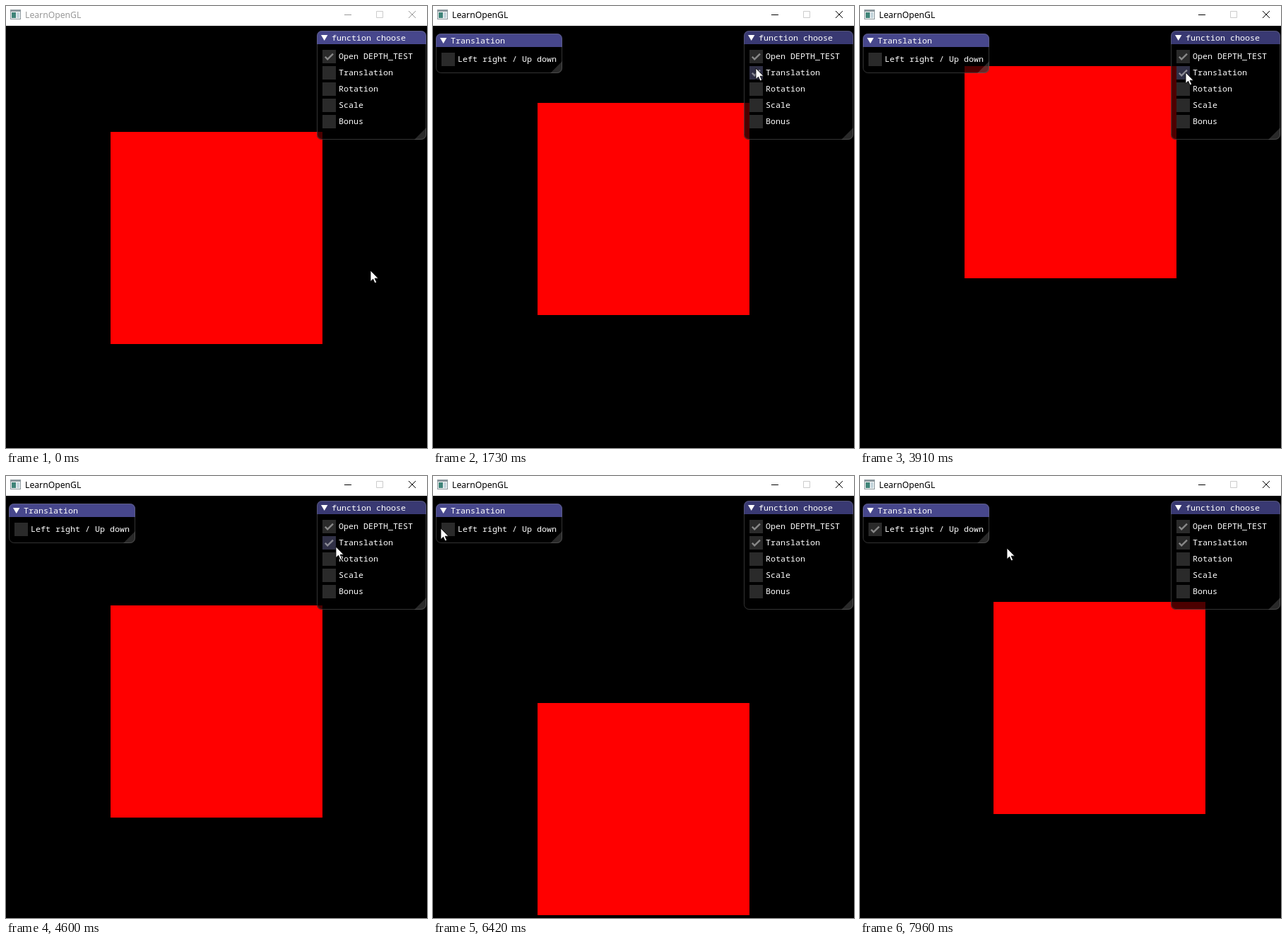
Animation of 596x625 px, one loop 8000 ms. Source, as an HTML page:

```html
<!DOCTYPE html>
<html lang="en">
<head>
<meta charset="utf-8">
<title>LearnOpenGL</title>
<style>
  html, body { margin: 0; width: 100%; height: 100%; overflow: hidden; background: #000; }
  svg { display: block; width: 596px; height: 625px; }
  text { white-space: pre; }
  .caption { font: 12.2px "Noto Sans", "Open Sans", sans-serif; fill: #999; }
  .buttons path { fill: none; stroke: #999; }
  .buttons .disabled { stroke: #ccc; }
  .focused .caption { fill: #000; }
  .focused .buttons path:not(.disabled) { stroke: #000; }
  .panel text { font: 11.667px "Noto Sans Mono", "DejaVu Sans Mono", monospace; fill: #fff; }
  .body { fill: rgba(0, 0, 0, .7); }
  .head { fill: rgba(69, 69, 138, .83); }
  .active .head { fill: rgba(82, 82, 161, .87); }
  .edge { fill: none; stroke: rgba(128, 128, 128, .4); }
  .grip { fill: rgba(255, 255, 255, .16); }
  .box { fill: rgba(110, 110, 110, .39); }
  .hover .box { fill: rgba(120, 120, 176, .4); }
  .press .box { fill: rgba(107, 105, 163, .69); }
  .tick { fill: none; stroke: rgba(230, 230, 230, .5); stroke-width: 2.4; visibility: hidden; }
  .on .tick { visibility: inherit; }
</style>
</head>
<body>
<svg id="stage" viewBox="0 0 596 625">
  <rect width="596" height="625"/>
  <rect id="quad" width="300" height="300" fill="#f00" shape-rendering="crispEdges"/>
  <g id="panels"></g>
  <g id="bar">
    <rect width="596" height="28" fill="#fff"/>
    <g shape-rendering="crispEdges">
      <rect x="6" y="5" width="15" height="14" fill="#8b979d"/>
      <rect x="7" y="8" width="13" height="10" fill="#f4f6f6"/>
      <rect x="8" y="9" width="6" height="8" fill="#3f8479"/>
      <rect x="15" y="9" width="4" height="8" fill="#c4d5dc"/>
    </g>
    <text class="caption" x="27" y="17">LearnOpenGL</text>
    <g class="buttons">
      <path d="M479 12.5H489"/>
      <path class="disabled" d="M524.5 7.5h9v9h-9z"/>
      <path d="M570 7L580 17M580 7L570 17"/>
    </g>
  </g>
  <path id="cursor" d="M0 0V15.6L3.6 12.2 6.1 17.8 8.6 16.7 6.1 11.2H11Z" fill="#fff" stroke="#000" stroke-width=".8"/>
</svg>
<script>
const LOOP = 8000, STEP = 46.4, LAST = 171;
const FOCUS = 25, MOVE = 26, PRESS = 143, SIDEWAYS = 145;
const $ = id => document.getElementById(id);

function node(parent, tag, attrs, text) {
  const el = document.createElementNS('http://www.w3.org/2000/svg', tag);
  for (const key in attrs) el.setAttribute(key, attrs[key]);
  if (text) el.textContent = text;
  return parent.appendChild(el);
}

function panel(x, y, w, h, title, labels) {
  const g = node($('panels'), 'g', { class: 'panel', transform: `translate(${x} ${y})` });
  node(g, 'path', { class: 'body', d: `M0 19H${w}V${h - 7}a7 7 0 0 1 -7 7H7a7 7 0 0 1 -7 -7Z` });
  node(g, 'path', { class: 'head', d: `M0 19V7a7 7 0 0 1 7 -7H${w - 7}a7 7 0 0 1 7 7V19Z` });
  node(g, 'path', { class: 'grip', d: `M${w} ${h - 17}V${h - 7}a7 7 0 0 1 -7 7H${w - 17}Z` });
  node(g, 'rect', { class: 'edge', x: .5, y: .5, width: w - 1, height: h - 1, rx: 7 });
  node(g, 'path', { d: 'M6 6H15.4L10.7 14Z', fill: '#fff' });
  node(g, 'text', { x: 21, y: 14 }, title);
  const rows = labels.map((label, i) => {
    const row = node(g, 'g', { transform: `translate(8 ${27 + 23 * i})` });
    node(row, 'rect', { class: 'box', width: 19, height: 19 });
    node(row, 'path', { class: 'tick', d: 'M3.8 9.8L7.2 13.4 15 5.6' });
    node(row, 'text', { x: 23, y: 13 }, label);
    return row;
  });
  return { g, rows };
}

const main = panel(440, 35, 155, 154, 'function choose',
  ['Open DEPTH_TEST', 'Translation', 'Rotation', 'Scale', 'Bonus']);
const side = panel(4, 39, 179, 56, 'Translation', ['Left right / Up down']);
main.rows[0].classList.add('on');

// [step, angle] and [step, x, y]
const phase = [[26, -.242], [37, .2768], [42, .508], [55, 1.105], [84, 2.473],
  [99, 3.175], [120, 4.164], [138, 5.019], [169, 6.457], [171, 6.56]];
const route = [[0, 516, 374], [17, 459, 88], [20, 457, 88], [67, 457, 88], [84, 461, 94],
  [99, 467, 100], [103, 467, 100], [120, 3, 78], [131, 0, 61], [134, 0, 61], [138, 11, 74],
  [142, 16, 78], [152, 16, 78], [160, 20, 82], [169, 128, 90], [171, 208, 102]];

const linear = p => p;
const smooth = p => p * p * (3 - 2 * p);

function sample(keys, k, ease) {
  let i = 0;
  while (i < keys.length - 2 && k >= keys[i + 1][0]) i++;
  const [a, b] = [keys[i], keys[i + 1]];
  const p = ease((k - a[0]) / (b[0] - a[0]));
  return a.slice(1).map((v, n) => v + (b[n + 1] - v) * p);
}

function setRow(row, on, hover, press) {
  row.classList.toggle('on', on);
  row.classList.toggle('hover', hover);
  row.classList.toggle('press', press);
}

function draw(now) {
  // The picture advances in fixed steps, like a screen capture.
  const k = Math.min(LAST, Math.max(0, Math.floor((now % LOOP - 5) / STEP)));
  const moving = k >= MOVE, sideways = k >= SIDEWAYS;
  const shift = moving ? 150 * Math.sin(sample(phase, k, linear)[0]) : 0;
  $('quad').setAttribute('x', Math.round(148 + (sideways ? shift : 0)));
  $('quad').setAttribute('y', Math.round(178 - (sideways ? 0 : shift)));

  const [cx, cy] = sample(route, k, smooth).map(Math.round);
  $('cursor').setAttribute('transform', `translate(${cx} ${cy})`);
  const over = (x, y, w) => k >= FOCUS && cx >= x && cx < x + w && cy >= y && cy < y + 19;

  $('bar').classList.toggle('focused', k >= FOCUS);
  main.g.classList.toggle('active', !moving);
  side.g.classList.add('active');
  side.g.style.visibility = moving ? 'visible' : 'hidden';
  setRow(main.rows[1], moving, over(448, 85, 100), k === FOCUS);
  setRow(side.rows[0], sideways, over(12, 66, 163), k >= PRESS && !sideways);
  requestAnimationFrame(draw);
}
draw(performance.now());
</script>
</body>
</html>
```
